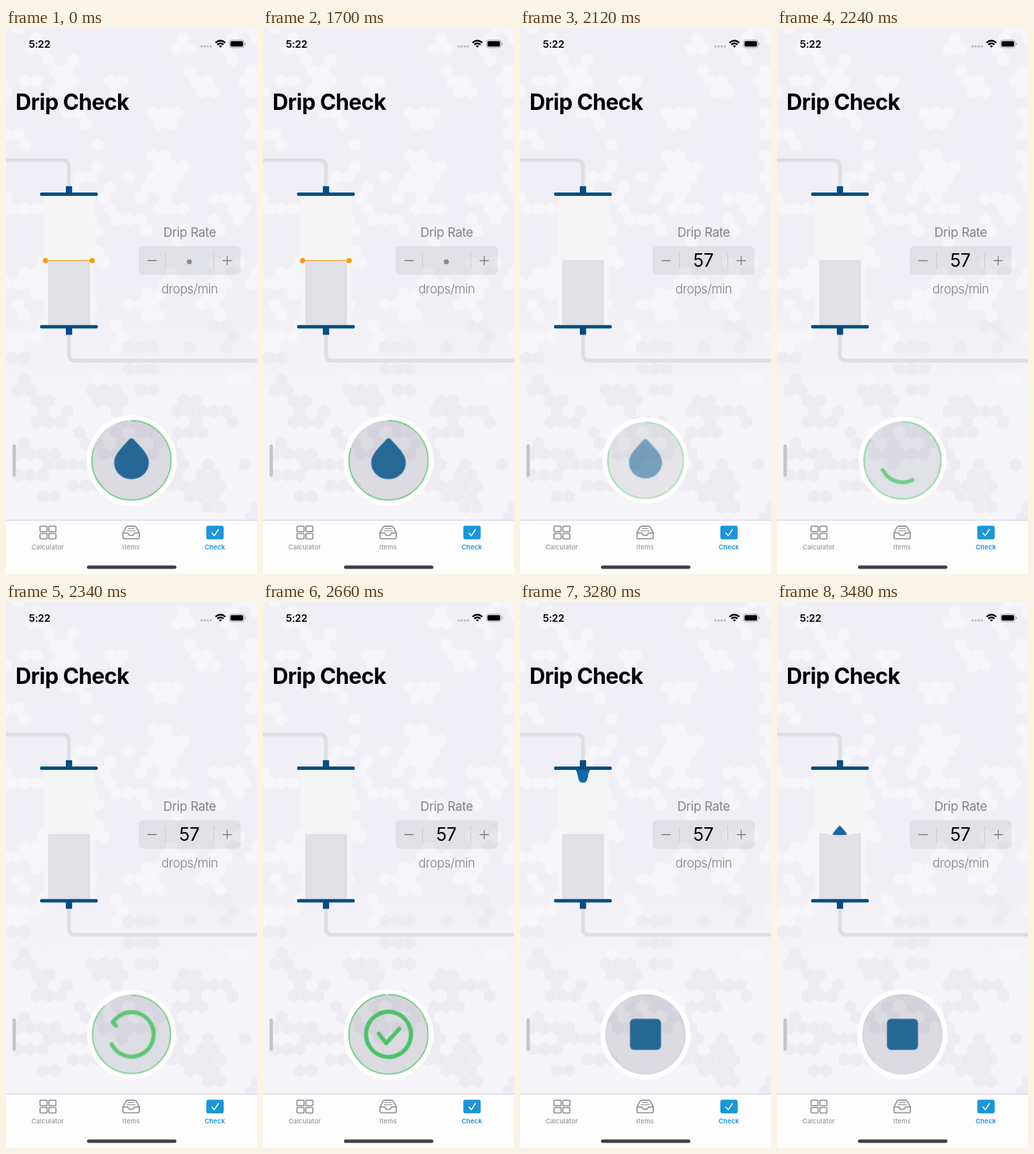
Write an HTML page that moves like this. It is 369 px wide and 800 px high and loops after 3.5 s.

```html
<!DOCTYPE html>
<html lang="en">
<head>
<meta charset="utf-8">
<title>Drip Check</title>
<style>
  html, body { margin: 0; width: 100%; height: 100%; overflow: hidden; background: #f0eff5; }
  svg { display: block; width: 100vw; height: 100vh; }
  text { font-family: Inter, "Liberation Sans", sans-serif; }
  .mid { text-anchor: middle; }
  .line { fill: none; stroke-linecap: round; stroke-linejoin: round; }
  .soft { fill: #838388; font-size: 18.5px; }
  .tab { font-size: 9.5px; font-weight: 500; letter-spacing: .15px; text-anchor: middle; fill: #97979b; }

  .anim { animation: 3.5s linear infinite both; }
  .before { animation-name: before; }
  .after { animation-name: after; }
  .press { animation-name: press; }
  .dim { animation-name: dim; }
  .progress { animation-name: progress; stroke-dasharray: 80 200; }
  .icon { animation-name: icon; }
  .done { animation-name: done; }
  .ring { animation-name: ring; stroke-dasharray: 100 200; }
  .tick { animation-name: tick; }
  .stop { animation-name: stop; }
  .bulge { animation-name: bulge; }
  .fall { animation-name: fall; }
  .liquid { animation-name: liquid; }

  @keyframes before { 0%, 59.42% { opacity: 1 } 59.43%, 100% { opacity: 0 } }
  @keyframes after { 0%, 59.42% { opacity: 0 } 59.43%, 100% { opacity: 1 } }
  @keyframes press {
    0%, 48.57% { transform: scale(1); animation-timing-function: ease-out }
    55%, 60.8% { transform: scale(.955) }
    66.86% { transform: scale(.986); animation-timing-function: ease-out }
    71%, 100% { transform: scale(1) }
  }
  @keyframes dim {
    0%, 48.57% { opacity: 1; animation-timing-function: ease-out }
    55%, 59.43% { opacity: .49 }
    60.57% { opacity: .61 }
    66.86% { opacity: .9 }
    71%, 100% { opacity: 1 }
  }
  @keyframes progress {
    0%, 61% { stroke-dasharray: 80 200; opacity: 1 }
    66.86% { stroke-dasharray: 88 200 }
    77% { stroke-dasharray: 100 200 }
    82.29% { stroke-dasharray: 100 200; opacity: 1 }
    86%, 100% { stroke-dasharray: 100 200; opacity: 0 }
  }
  @keyframes icon { 0%, 60.57% { opacity: 1 } 64%, 100% { opacity: 0 } }
  @keyframes done {
    0%, 62.8% { opacity: 0 }
    64%, 82.29% { opacity: 1; animation-timing-function: ease-out }
    87.43% { opacity: .1 }
    90%, 100% { opacity: 0 }
  }
  @keyframes ring {
    0%, 62.8% { stroke-dashoffset: 100 }
    66.86% { stroke-dashoffset: 16.5 }
    69.5%, 100% { stroke-dashoffset: 0 }
  }
  @keyframes tick {
    0%, 66.2% { stroke-dasharray: 0 200; stroke-dashoffset: 0; opacity: 0 }
    66.3% { opacity: 1 }
    66.86% { stroke-dasharray: 7 200; stroke-dashoffset: 0; opacity: 1; animation-timing-function: ease-out }
    78.86%, 100% { stroke-dasharray: 50 200; stroke-dashoffset: -24; opacity: 1 }
  }
  @keyframes stop {
    0%, 82.29% { opacity: 0; transform: scale(.5); animation-timing-function: ease-out }
    87.43% { opacity: .88; transform: scale(.9); animation-timing-function: ease-out }
    93%, 100% { opacity: 1; transform: scale(1) }
  }
  @keyframes bulge {
    0%, 84% { d: path("M76 243C84 243 84 243 92.5 243C101 243 101 243 109 243Z") }
    87.43% { d: path("M75 244C84 245 84 251.5 92.5 251.5C101 251.5 101 245 110 244Z") }
    97.14% { d: path("M79 244C91 246 80 272 92.5 272C105 272 94 246 106 244Z") }
    97.7% { d: path("M80 244C88 245 88 249 92.5 249C97 249 97 245 105 244Z") }
    98.86%, 100% { d: path("M76 243C84 243 84 243 92.5 243C101 243 101 243 109 243Z") }
  }
  @keyframes fall {
    0%, 97.13% { opacity: 0; transform: translate(92.3px, 260px) scale(.43) }
    97.14% { opacity: 1; transform: translate(92.3px, 260px) scale(.43); animation-timing-function: ease-in }
    99.43%, 100% { opacity: 1; transform: translate(92.3px, 342px) scale(.43) }
  }
  @keyframes liquid {
    0%, 98.86% { d: path("M62 435V340Q92.75 340 123.5 340V435Z") }
    99.43%, 100% { d: path("M62 435V338Q92.75 345 123.5 338V435Z") }
  }
</style>
</head>
<body>
<svg viewBox="0 0 369 800">
  <defs>
    <linearGradient id="sky" x2="0" y2="1">
      <stop offset=".5" stop-color="#f0eff5"/>
      <stop offset=".72" stop-color="#f5f5f9"/>
    </linearGradient>
    <path id="drop" d="M0-32.5C2-32.5 3-31.5 5-29C13-20 25.5-9 25.5 3C25.5 17 14 27.5 0 27.5C-14 27.5-25.5 17-25.5 3C-25.5-9-13-20-5-29C-3-31.5-2-32.5 0-32.5Z"/>
  </defs>
  <rect width="369" height="800" fill="url(#sky)"/>
  <path id="light" fill="#f6f6fa"/>
  <path id="dark" fill="#edecf2"/>

  <!-- status bar -->
  <text x="33.5" y="28.8" font-size="15" font-weight="600" letter-spacing="-.3">5:22</text>
  <g fill="#b9b9bd">
    <circle cx="287.5" cy="27" r="1.7"/><circle cx="292" cy="27" r="1.7"/>
    <circle cx="296.5" cy="27" r="1.7"/><circle cx="301" cy="27" r="1.7"/>
  </g>
  <g fill="none" stroke="#000" stroke-width="2.2">
    <path d="M308 21.6Q315.2 15.4 322.4 21.6"/>
    <path d="M310.6 24.4Q315.2 20.6 319.8 24.4"/>
  </g>
  <path d="M312.8 26.3Q315.2 24.5 317.6 26.3L315.2 28.8Z"/>
  <rect x="328.5" y="17.8" width="21.5" height="11" rx="3" fill="none" stroke="#a5a5a8"/>
  <rect x="330" y="19.3" width="18.5" height="8" rx="1.8"/>
  <path d="M351.3 21.4Q353 22 353 23.3T351.3 25.2Z" fill="#a5a5a8"/>

  <text x="14" y="120.3" font-size="32" font-weight="700" letter-spacing="-.6">Drip Check</text>

  <!-- drip chamber -->
  <g fill="none" stroke="#dfdee4" stroke-width="5.5">
    <path d="M0 194H83Q92.5 194 92.5 203.5V234"/>
    <path d="M92.5 448V478Q92.5 487.5 102 487.5H369"/>
  </g>
  <rect x="55.5" y="244" width="75" height="192" fill="#f5f5f5"/>
  <path class="anim bulge" fill="#1268a6"/>
  <use class="anim fall" href="#drop" fill="#1766a0"/>
  <path class="anim liquid" fill="#e1e0e4"/>
  <g fill="#034d83">
    <rect x="50" y="241" width="85" height="5" rx="2.2"/>
    <rect x="88" y="231.8" width="9.2" height="10"/>
    <rect x="50" y="435.3" width="85" height="5" rx="2.2"/>
    <rect x="88" y="439.5" width="9.2" height="10"/>
  </g>
  <g class="anim before" fill="#ff9809">
    <path d="M58 340.6H127" stroke="#f5a02c" stroke-width="1.3"/>
    <circle cx="58" cy="340.8" r="3.8"/><circle cx="126.7" cy="340.8" r="3.8"/>
  </g>

  <!-- rate -->
  <text class="soft mid" x="270" y="305.5" letter-spacing="-.3">Drip Rate</text>
  <rect x="195" y="319.7" width="150" height="41.8" rx="6.5" fill="#767680" fill-opacity=".12"/>
  <path d="M234.5 329V352.5M305.5 329V352.5" stroke="#cac9cf"/>
  <path class="line" d="M208.5 340.7H221M319 340.7H331.5M325.2 334.5V347" stroke="#7c7c81" stroke-width="1.4"/>
  <circle class="anim before" cx="269.5" cy="342.6" r="3.7" fill="#8a8a8e"/>
  <text class="anim after mid" x="269.5" y="350.2" font-size="26.5" letter-spacing="-.3">57</text>
  <text class="soft mid" x="270" y="389" font-weight="300" letter-spacing="-.45">drops/min</text>

  <rect x="9.5" y="610" width="5" height="47.5" rx="2.5" fill="#c5c4c9"/>

  <!-- button -->
  <g transform="translate(184.5 633.5)">
    <g class="anim press">
      <circle r="62.2" fill="none" stroke="#fff" stroke-width="7.6"/>
      <g class="anim dim">
        <circle r="58.5" fill="#767680" fill-opacity=".2"/>
        <circle r="58.2" fill="none" stroke="#c6c6cb"/>
        <circle class="anim progress" r="58.2" pathLength="100" transform="rotate(-90)" fill="none" stroke="#34c759" stroke-width="1.3"/>
        <use class="anim icon" href="#drop" fill="#256896"/>
        <g class="anim done line" stroke="#4cc168" stroke-width="6">
          <path class="anim ring" pathLength="100" d="M-29.7 14.5A33 33 0 0 0 29.7-14.5A33 33 0 0 0-29.7 14.5"/>
          <path class="anim tick" d="M-27.5-18.5L-3.5 13L18.5-11"/>
        </g>
        <rect class="anim stop" x="-22.8" y="-22.8" width="45.6" height="45.6" rx="6" fill="#256896"/>
      </g>
    </g>
  </g>

  <!-- tab bar -->
  <rect y="721" width="369" height="79" fill="#fdfdfe"/>
  <path d="M0 721.2H369" stroke="#cfcfd3"/>
  <g class="line" stroke="#97979b" stroke-width="1.8">
    <rect x="50" y="729.8" width="10.4" height="8" rx="1.6"/>
    <rect x="63" y="729.8" width="10.4" height="8" rx="1.6"/>
    <rect x="50" y="740.6" width="10.4" height="8" rx="1.6"/>
    <rect x="63" y="740.6" width="10.4" height="8" rx="1.6"/>
    <path d="M172 739.5L176.5 731.5Q177.4 730 179 730H189Q190.6 730 191.5 731.5L196 739.5V746Q196 748.3 193.7 748.3H174.3Q172 748.3 172 746Z"/>
    <path d="M172.4 739.8H179.3Q180 743.6 184 743.6T188.7 739.8H195.6"/>
    <path d="M179.5 733.4H188.5M178 736.6H190" stroke-width="1.4"/>
  </g>
  <rect x="294.5" y="729.2" width="25.5" height="20" rx="3" fill="#1a96db"/>
  <path class="line" d="M302.8 740L306.2 744L312.3 734.8" stroke="#fff" stroke-width="1.6"/>
  <text class="tab" x="61.3" y="764">Calculator</text>
  <text class="tab" x="184" y="764">Items</text>
  <text class="tab" x="307" y="764" style="fill:#1a94dc;font-weight:600">Check</text>
  <rect x="119" y="787.6" width="131.5" height="5" rx="2.5" fill="#3f3f41"/>
</svg>
<script>
  // Honeycomb backdrop: short seeded walks over a hexagonal grid.
  let seed = 522;
  const rand = () => (seed = seed * 16807 % 2147483647) / 2147483647;
  const pick = n => Math.floor(rand() * n);
  const cells = { light: new Set(), dark: new Set() };

  const hex = key => {
    const [col, row] = key.split(',').map(Number);
    const x = col * 18 + (row & 1) * 9, y = row * 15.6;
    return `M${x} ${y - 10}l8.7 5v10l-8.7 5l-8.7-5v-10z`;
  };

  for (let i = 0; i < 130; i++) {
    let col = pick(22), row = pick(47);
    const steps = 1 + pick(4);
    const tone = row * 15.6 > 400 + rand() * 130 ? 'dark' : 'light';
    for (let s = 0; s < steps; s++) {
      cells[tone].add(col + ',' + row);
      if (rand() < .5) col += 1;
      else row += 1;
    }
  }
  for (const tone in cells) {
    document.getElementById(tone).setAttribute('d', [...cells[tone]].map(hex).join(''));
  }
</script>
</body>
</html>
```
